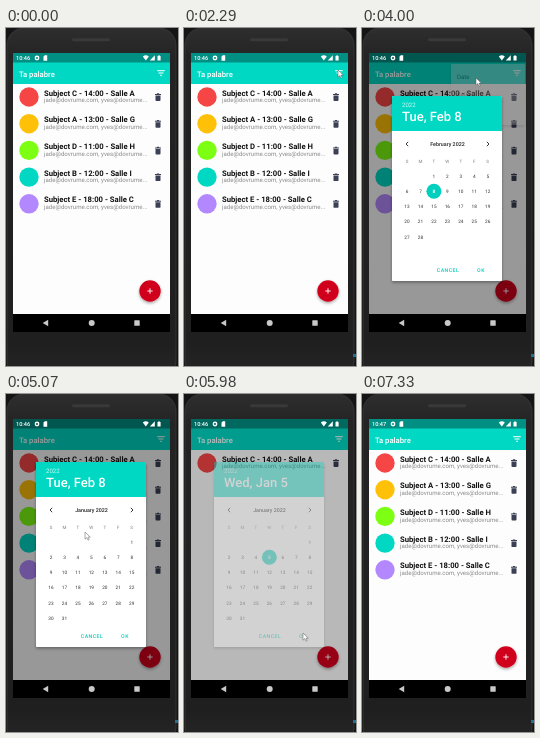
Write an HTML page that moves like this. It is 172 px wide and 338 px high and loops after 8000 ms.

```html
<!DOCTYPE html>
<html lang="fr">
<head>
<meta charset="utf-8">
<title>Agenda</title>
<style>
html, body { margin: 0; width: 100%; height: 100%; overflow: hidden; background: #151515; }
svg { display: block; width: 100vw; height: 100vh; }
text { font-family: Roboto, "Noto Sans", sans-serif; text-rendering: geometricPrecision; }
.mid { text-anchor: middle; }
.title { font-size: 7.7px; font-weight: 700; fill: #111; }
.mail { font-size: 6.1px; fill: #8b8b8b; }
.item { font-size: 6.1px; fill: #222; }
.weekday { font-size: 4.5px; fill: #808080; }
.day { font-size: 4.7px; fill: #333; }
.month { font-size: 5.35px; font-weight: 500; fill: #222; }
.date { font-size: 13px; font-weight: 500; fill: #fff; }
.button { font-size: 5.2px; font-weight: 500; letter-spacing: .45px; fill: #00cdb9; }
.clock { font-size: 5.6px; font-weight: 500; fill: #fff; }

/* One loop is 8 s, so 1% is 80 ms. */
.anim { animation: 8s linear infinite; }
.hard { animation-timing-function: step-end; }
#cursor { animation-name: cursor; animation-timing-function: ease-in-out; }
#pointer { animation-name: pointer; }
#menu { animation-name: menu, grow; transform-origin: 163px 36px; }
#dim { animation-name: dim; }
#dialog { animation-name: dialog; }
#feb { animation-name: feb; }
#jan { animation-name: jan; }
#rest { animation-name: rest; }
#edge { animation-name: edge; }
.before { animation-name: before; }
.picked { animation-name: picked; }
.early { animation-name: early; }
.late { animation-name: late; }

@keyframes pointer { 0% { opacity: 0 } 9.25% { opacity: 1 } 91.6%, 100% { opacity: 0 } }
@keyframes cursor {
  0%, 9.25% { transform: translate(151px, 257px) }
  14.25%, 16.2% { transform: translate(134px, 152px) }
  16.9%, 20.5% { transform: translate(134px, 150px) }
  28%, 32.5% { transform: translate(154px, 42px) }
  39.8%, 51% { transform: translate(114px, 50px) }
  57.3%, 60.8% { transform: translate(44px, 114px) }
  63.4% { transform: translate(79px, 138px) }
  64.8%, 66.8% { transform: translate(85px, 160px) }
  70.5%, 75.4% { transform: translate(119px, 239px) }
  80%, 82.5% { transform: translate(154px, 42px) }
  87.5%, 100% { transform: translate(114px, 83px) }
}
@keyframes menu {
  0%, 31.5% { opacity: 0 } 33.5%, 48.1% { opacity: 1 } 51%, 81.25% { opacity: 0 }
  83.5%, 89% { opacity: 1 } 91.3%, 100% { opacity: 0 }
}
@keyframes grow {
  0%, 31.5% { transform: scale(.7) } 33.5%, 81.2% { transform: none }
  81.25% { transform: scale(.7) } 83.5%, 100% { transform: none }
}
@keyframes dim { 0%, 48.25% { opacity: 0 } 49.9%, 74% { opacity: .4 } 76.4%, 100% { opacity: 0 } }
@keyframes dialog { 0%, 48.25% { opacity: 0 } 49.9%, 73.5% { opacity: 1 } 75.5%, 100% { opacity: 0 } }
@keyframes feb { 0%, 60.6% { transform: none } 62.6%, 100% { transform: translateX(110px) } }
@keyframes jan { 0%, 60.6% { transform: translateX(-110px) } 62.6%, 100% { transform: none } }
@keyframes rest { 0% { opacity: 1 } 73.5% { opacity: 0 } 89.4%, 100% { opacity: 1 } }
@keyframes edge { 0% { opacity: 0 } 25%, 100% { opacity: 1 } }
@keyframes before { 0% { opacity: 1 } 66.25%, 100% { opacity: 0 } }
@keyframes picked { 0% { opacity: 0 } 66.25%, 100% { opacity: 1 } }
@keyframes early { 0% { opacity: 1 } 77.5%, 100% { opacity: 0 } }
@keyframes late { 0% { opacity: 0 } 77.5%, 100% { opacity: 1 } }
</style>
</head>
<body>
<svg viewBox="0 0 172 338" preserveAspectRatio="none">
  <defs>
    <filter id="shadow" x="-30%" y="-30%" width="160%" height="170%">
      <feDropShadow dx="0" dy="1.5" stdDeviation="1.6" flood-opacity=".35"/>
    </filter>
    <linearGradient id="body" x1="0" x2="0" y1="0" y2="1">
      <stop offset="0" stop-color="#2e2e2e"/>
      <stop offset=".08" stop-color="#242424"/>
      <stop offset=".9" stop-color="#1f1f1f"/>
      <stop offset="1" stop-color="#262626"/>
    </linearGradient>
    <clipPath id="page"><rect x="30" y="104" width="110" height="130"/></clipPath>
    <g id="trash" fill="#3b4054">
      <path d="M-3-3h1.6l.5-.7h1.8l.5.7H3v1h-6z"/>
      <path d="M-2.5-1.5h5v4.6q0 .9-.9.9h-3.2q-.9 0-.9-.9z"/>
    </g>
  </defs>

  <!-- Handset -->
  <rect width="172" height="338" fill="#151515"/>
  <rect x="1" y="0" width="169" height="350" rx="17" fill="url(#body)" stroke="#3a3a3a" stroke-width=".8"/>
  <rect x="66" y="10.3" width="38" height="3" rx="1.5" fill="#393939"/>
  <rect id="edge" class="anim hard" x="169" y="326" width="3" height="3" fill="#256f92"/>

  <!-- App -->
  <rect x="7" y="25" width="157" height="261" fill="#fdfdfd"/>
  <rect x="7" y="34" width="157" height="22" fill="#00d8c4"/>
  <rect x="7" y="25" width="157" height="9.5" fill="#018f84"/>
  <text x="13" y="48.5" font-size="7.7" font-weight="500" fill="#fff">Ta palabre</text>
  <path d="M151.2 42.7h7.6M152.5 45h5M154.1 47.3h1.8" stroke="#fff"/>
  <g id="first"></g>
  <g id="rest" class="anim hard"></g>
  <g filter="url(#shadow)"><circle cx="144" cy="263" r="10.7" fill="#d0021f"/></g>
  <path d="M141.3 263h5.4M144 260.3v5.4" stroke="#fff" stroke-width=".9"/>

  <g id="menu" class="anim">
    <rect x="89" y="36" width="74" height="61" rx="1.2" fill="#fff" filter="url(#shadow)"/>
    <text class="item" x="95" y="50.6">Date</text>
    <text class="item" x="95" y="68.9">Salle</text>
    <text class="item" x="95" y="87.2">Effacer le filtre</text>
  </g>
  <rect id="dim" class="anim" x="7" y="25" width="157" height="261"/>

  <!-- Date picker -->
  <g id="dialog" class="anim">
    <rect x="30" y="68" width="110" height="185" rx="1" fill="#fff" filter="url(#shadow)"/>
    <path d="M30 103V69q0-1 1-1h108q1 0 1 1v34z" fill="#00d8c4"/>
    <text x="40" y="79.2" font-size="6.1" fill="#fff" opacity=".8">2022</text>
    <text class="date anim hard before" x="40" y="92.8">Tue, Feb 8</text>
    <text class="date anim hard picked" x="40" y="92.8">Wed, Jan 5</text>
    <g clip-path="url(#page)">
      <g id="feb" class="anim"></g>
      <g id="jan" class="anim"></g>
    </g>
    <path d="M46.2 113.8l-2.2 2.2 2.2 2.2M124.8 113.8l2.2 2.2-2.2 2.2" fill="none" stroke="#222" stroke-width=".9"/>
    <text class="button mid" x="86" y="244.2">CANCEL</text>
    <text class="button mid" x="119" y="244.2">OK</text>
  </g>

  <!-- System bars -->
  <g fill="#fff">
    <text class="clock anim hard early" x="10" y="32">10:46</text>
    <text class="clock anim hard late" x="10" y="32">10:47</text>
    <circle cx="31" cy="30" r="1.7" fill="none" stroke="#fff" stroke-width="1.4"/>
    <path d="M37.5 28.5l1.3-1.2h2.4v5.4h-3.7z"/>
    <path d="M136.8 28.5q3-2.3 6 0l-3 4z"/>
    <path d="M148.8 27.3v5.2h-5z"/>
    <path d="M151.5 28h.9v-.7h1.3v.7h.9v4.6h-3.1z"/>
  </g>
  <rect x="7" y="286" width="157" height="18" fill="#000"/>
  <g fill="#c9c9c9">
    <path d="M36.7 295l5.5-3.2v6.4z"/>
    <circle cx="85.7" cy="295" r="3"/>
    <rect x="128.3" y="292.3" width="5.4" height="5.4" rx=".5"/>
  </g>

  <g id="pointer" class="anim hard">
    <path id="cursor" class="anim" d="M0 0v7.2l1.8-1.6 1.2 2.6 1.2-.6-1.2-2.5h2.3z" fill="#fff" stroke="#555" stroke-width=".5"/>
  </g>
</svg>
<script>
const byId = id => document.getElementById(id);
const label = (cls, x, y, text, extra = '') => `<text class="${cls}" x="${x}" y="${y}" ${extra}>${text}</text>`;

const meetings = [
  ['C - 14:00 - Salle A', '#f64545'],
  ['A - 13:00 - Salle G', '#ffc107'],
  ['D - 11:00 - Salle H', '#7cff12'],
  ['B - 12:00 - Salle I', '#00d8c4'],
  ['E - 18:00 - Salle C', '#b388ff']
];
const rows = meetings.map(([name, color], i) => {
  const y = 69 + i * 26.7;
  return `<circle cx="23" cy="${y}" r="9.7" fill="${color}"/>` +
    label('title', 38, y - 1.5, 'Subject ' + name) +
    label('mail', 38, y + 5.2, 'jade@dovrume.com, yves@dovrume...') +
    `<use href="#trash" x="152" y="${y}"/>`;
});
byId('first').innerHTML = rows[0];
byId('rest').innerHTML = rows.slice(1).join('');

const columnX = column => 45 + column * 13.45;

function monthPage(name, firstColumn, days, selected, state) {
  let page = label('month mid', 85.5, 117.9, name + ' 2022');
  [...'SMTWTFS'].forEach((letter, i) => page += label('weekday mid', columnX(i), 134.5, letter));
  for (let day = 1; day <= days; day++) {
    const cell = firstColumn + day - 1;
    const x = columnX(cell % 7), y = 148 + Math.floor(cell / 7) * 15.2;
    page += label('day mid', x, y + 1.7, day);
    if (day === selected) {
      page += `<g class="${state}"><circle cx="${x}" cy="${y}" r="7.5" fill="#00d0bd"/>` +
        label('day mid', x, y + 1.7, day, 'style="fill:#fff;font-weight:700"') + '</g>';
    }
  }
  return page;
}
byId('feb').innerHTML = monthPage('February', 2, 28, 8, '');
byId('jan').innerHTML = monthPage('January', 6, 31, 5, 'anim hard picked');
</script>
</body>
</html>
```
